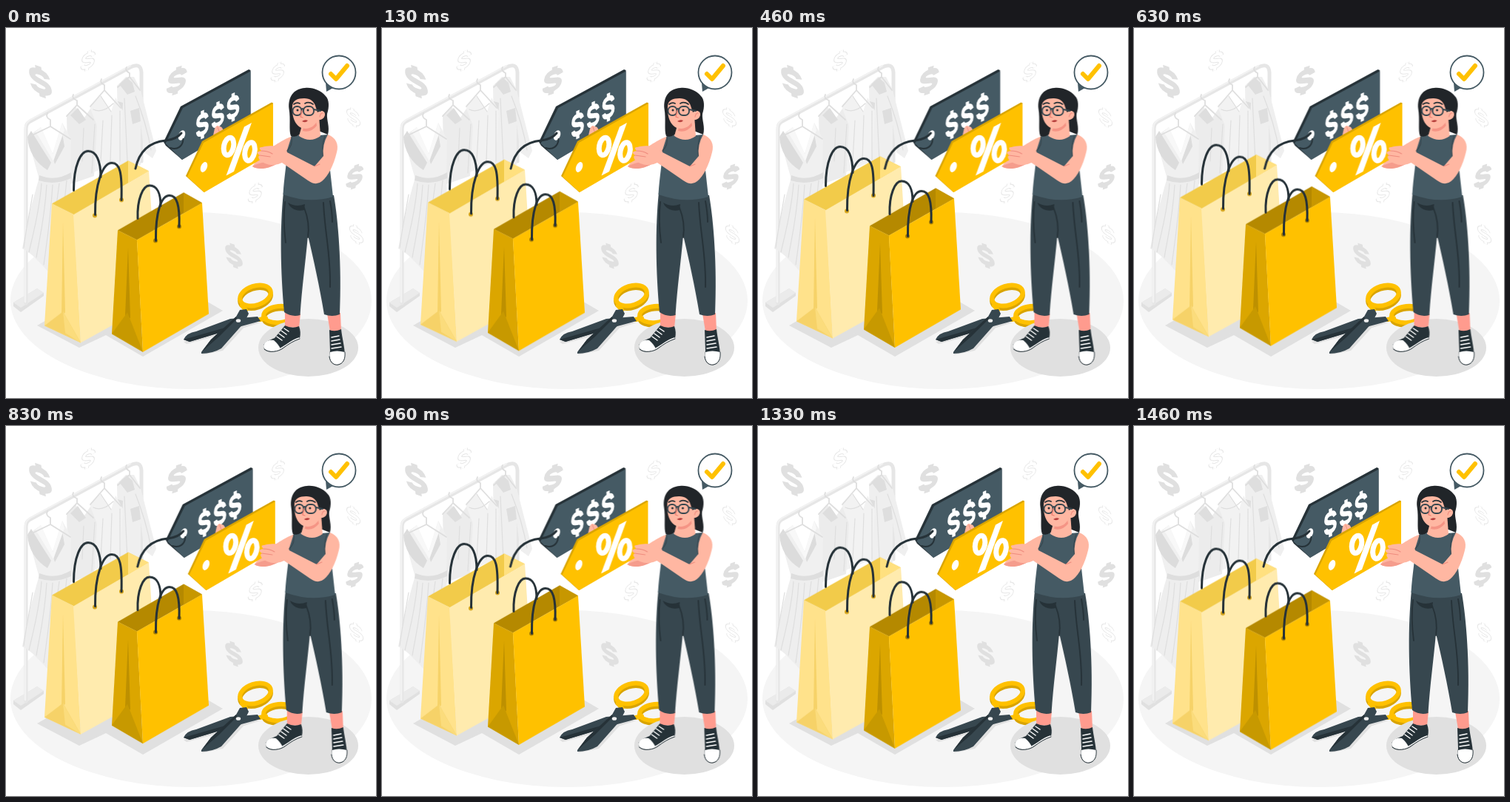
An HTML page for the animation above (1500 ms loop, 500 by 500 pixels).

```html
<!DOCTYPE html>
<html lang="en">
<head>
<meta charset="utf-8">
<title>Discount shopping</title>
<style>
  html, body { margin: 0; width: 100%; height: 100%; overflow: hidden; background: #fff; }
  svg { display: block; width: 100%; height: 100%; }
  .line { fill: none; stroke-linecap: round; stroke-linejoin: round; }
  .cord { stroke: #263238; stroke-width: 3; }
  .fold { stroke: #dedede; stroke-width: 1.2; }
  .crease { stroke: #263238; stroke-width: 1.8; }
  .lace { stroke: #fff; stroke-width: 1.5; }
  .skin { fill: #ffb7a2; }
  .float { animation: float 1.5s linear infinite; }
  .shake { animation: shake 1.5s ease infinite; }
  @keyframes float { 50% { transform: translateY(-10px); } }
  @keyframes shake {
    0%, 100% { transform: translateX(0); }
    10%, 90% { transform: translateX(-1px); }
    20%, 80% { transform: translateX(2px); }
    30%, 50%, 70% { transform: translateX(-4px); }
    40%, 60% { transform: translateX(4px); }
  }
</style>
</head>
<body>
<svg viewBox="0 0 500 500">
  <defs>
    <path id="dollar" fill="none" d="M9,-6C8,-10 5,-12 0,-12C-6,-12 -9,-10 -9,-6C-9,-2 -4,-1 0,0C5,1 9,2 9,6C9,10 5,12 0,12C-6,12 -9,10 -9.5,6M0,-19V-12M0,12V19"/>
  </defs>

  <ellipse cx="250" cy="368.500" rx="244" ry="119.500" fill="#f5f5f5"/>
  <g id="money"></g>

  <g id="rack">
    <path d="M10,371L42,352L51,358L51,362L20,384L10,376Z" fill="#e0e0e0"/>
    <path d="M10,371L42,352L51,358L20,378Z" fill="#ebebeb"/>
    <path class="line" stroke="#e6e6e6" stroke-width="5" d="M27,372V136Q27,129 33,126L168,53Q182,46 183,60V180"/>
    <path class="line" stroke="#f2f2f2" stroke-width="2.500" d="M26,370V136Q26,128 33,124L168,51"/>
    <path d="M150,78L162,66L173,66L182,84L203,166L198,176L187,168L182,130V185L152,188Z" fill="#efefef"/>
    <path d="M153,76L163,67L171,74L174,86L164,90ZM147,98L158,101L157,118L148,110ZM168,112L180,108L182,126L171,130Z" fill="#dedede"/>
    <path d="M114,104L128,92L142,113L148,94L158,112L154,180L116,196Z" fill="#f2f2f2"/>
    <path d="M82,118L94,106L104,124L114,109L123,132L119,200L84,212Z" fill="#ececec"/>
    <path d="M87,118L97,108L108,124L99,130Z" fill="#dedede"/>
    <path class="line fold" d="M118,110Q130,116 145,102M128,92L142,113M105,135L103,180M131,125L128,180M143,118L141,180M160,95L164,180M175,92Q190,130 196,165M116,196L120,130M154,112V180"/>
    <path d="M45,202L87,198L90,330H58C46,318 35,304 22,298C28,264 36,232 45,202Z" fill="#eeeeee"/>
    <path d="M29,147L47,134L63,170L76,128L88,150L87,200L45,205Z" fill="#f0f0f0"/>
    <path d="M29,147L34,139L47,160L61,182L56,192C40,182 30,166 29,147ZM62,172L76,142L79,160L66,184Z" fill="#dcdcdc"/>
    <path d="M47,134L63,170L76,128L79,138L64,180L40,140Z" fill="#f8f8f8"/>
    <path d="M45,199Q67,208 88,195L88,203Q66,213 44,206Z" fill="#dedede"/>
    <path class="line fold" d="M48,210C45,250 36,280 31,303M55,212C52,260 45,285 41,310M63,212C60,260 55,290 51,320M72,210L68,240M82,206L79,235M36,225C31,255 26,278 24,297"/>
    <path class="line" stroke="#dedede" stroke-width="1.800" d="M31,147L60,133L87,150M60,133V124Q53,121 56,115M82,119L96,104L118,124M96,104V98Q88,95 91,90M114,106L133,84L155,108M133,84V77Q126,74 129,69M151,80L167,66L181,84M167,66V61Q160,57 163,53"/>
  </g>

  <path d="M42,402L70,386L210,360L150,408L99,432Z" fill="#e0e0e0"/>
  <path d="M128,411L160,390L262,364L293,382L185,444Z" fill="#e0e0e0"/>

  <g class="float">
    <g transform="translate(0 .6)">
      <path d="M62,237L165,179L193,193L92,252Z" fill="#f2cb4a"/>
      <path d="M165,179L193,193L165,209Z" fill="#ffe07f"/>
      <path d="M62,237L92,252L101,425L52,402Z" fill="#ffe28b"/>
      <path d="M77,263L80,384L75,388Z" fill="#f6d268"/>
      <path d="M77,383L101,425L52,402Z" fill="#f6d268"/>
      <path d="M77,383L101,425L80,412Z" fill="#fbdc7c"/>
      <path d="M91,252L193,193L204,368L101,425Z" fill="#ffebae"/>
      <path class="line cord" d="M91.500,219C91.500,185 101,166 111,166C122,166 128,179 128,201"/>
      <circle cx="120" cy="253" r="3" fill="#d6a51c"/><circle cx="156" cy="232" r="3" fill="#d6a51c"/>
      <path class="line cord" d="M120.500,252C120,209 131,182 143,182C154,182 157,195 156,232"/>

      <path d="M151,273L240,222L265,236L177,286Z" fill="#b58900"/>
      <path d="M240,222L265,236L240,250Z" fill="#c79700"/>
      <path d="M151,273L177,286L185,437.500L143,413Z" fill="#dba600"/>
      <path d="M165,297L168,392L161,388Z" fill="#bd9000"/>
      <path d="M164,384L185,437.500L143,413Z" fill="#c79900"/>
      <path d="M177,286L265,236L274,386L185,437.500Z" fill="#ffc100"/>
      <path class="line cord" d="M178,257C177,231 185,212.500 194,212.500C204,212.500 209,223 209,240"/>
      <circle cx="202" cy="287" r="3" fill="#a77d00"/><circle cx="234" cy="268" r="3" fill="#a77d00"/>
      <path class="line cord" d="M202.500,287C202,247 210,226 221,226C231,226 235,239 234,268"/>
    </g>
  </g>

  <g id="scissors">
    <path d="M240,424L305,398L344,398L322,405L300,412L244,427ZM264,442L316,392L324,402L293,436Z" fill="#e0e0e0"/>
    <g class="line" stroke="#d9a400" stroke-width="6">
      <ellipse cx="337" cy="365" rx="21.500" ry="13" transform="rotate(-18 337 365)"/>
      <ellipse cx="369" cy="390.500" rx="21" ry="11" transform="rotate(-6 369 390.500)"/>
    </g>
    <g class="line" stroke="#ffc100" stroke-width="6">
      <ellipse cx="337" cy="361.500" rx="21.500" ry="13" transform="rotate(-18 337 361.500)"/>
      <ellipse cx="369" cy="387" rx="21" ry="11" transform="rotate(-6 369 387)"/>
      <path d="M319,375L324,381M343,394L351,392"/>
    </g>
    <path d="M240,421Q244,412 257,410L303,393L340,390L344,396L318,403L298,409L248,424Z" fill="#37474f"/>
    <path d="M240,421L248,424L298,409L318,403L296,405Z" fill="#263238"/>
    <path d="M264,438L277,421L311,390L316,381L325,380L328,386L322,398L291,433Q279,440 264,440Z" fill="#37474f"/>
    <path d="M264,438L277,421L311,390L312,393L288,417Z" fill="#263238"/>
    <ellipse cx="314" cy="395.500" rx="3.200" ry="2.300" fill="#f0f0f0"/>
  </g>

  <ellipse cx="408.500" cy="432" rx="67.500" ry="39" fill="#e0e0e0"/>

  <g class="shake">
    <path d="M213,154L236,106L328,56L330.500,57V122L238,178L216,159Z" fill="#263238"/>
    <path d="M215.500,156L239,108L330.500,58.500V124L238,178Z" fill="#455a64"/>
    <ellipse cx="237.500" cy="145" rx="4.300" ry="7" fill="#fff" transform="rotate(22 237.500 145)"/>
    <path class="line cord" d="M175,190C180,166 195,154 216,152C226,151 233,147 237,142"/>
    <path class="line" stroke="#263238" stroke-width="2" d="M239.500,150C239,160 232,165 222,162"/>
    <g id="price" stroke="#fff" stroke-width="6.500"></g>

    <path class="skin" d="M388,146C374,150 366,158 346,169L333,187C342,193 357,189 365,184L386,168Z"/>
    <path d="M333,187C341,182 352,182 366,174L365,184C357,189 342,193 333,187Z" fill="#f59c8c"/>
    <path class="skin" d="M280,145L282,136Q285,130 288,133Q292,132 294,139L296,148Z"/>
    <path class="line" stroke="#f08f80" d="M286,134L289,142"/>

    <path d="M243,200L265,153L359,100.500L361,101.500V167L267.500,222Z" fill="#d9a400"/>
    <path d="M245,201L267,155L361,102V168L268,222Z" fill="#ffc100"/>
    <ellipse cx="267.500" cy="188" rx="4.300" ry="7.200" fill="#fff" transform="rotate(22 267.500 188)"/>
    <g class="line" stroke="#fff" stroke-width="7">
      <ellipse cx="301" cy="160" rx="6.500" ry="12" transform="rotate(12 301 160)"/>
      <ellipse cx="329.500" cy="167" rx="6.500" ry="12.500" transform="rotate(12 329.500 167)"/>
    </g>
    <path d="M322,133.500L332,128L308,194L297.500,199.500Z" fill="#fff"/>

    <path d="M377,382L398,386L396,405L377,404ZM434,386L452,385L453,410L438,410Z" fill="#ff9b8e"/>
    <path d="M348,430C348,424 356,422 363,419L377,402Q387,407 396,403Q399,411 397,419C385,423 378,431 369,435C358,440 349,437 348,430Z" fill="#263238"/>
    <path d="M348,430C349,423 356,421 362,422Q369,428 371,434C361,440 349,437 348,430Z" fill="#fff"/>
    <path class="line" stroke="#fff" stroke-width="1.500" d="M371,433C379,429 386,422 396,419"/>
    <path class="line" stroke="#263238" d="M349,434C355,440 369,437 374,433C382,427 388,423 397,420"/>
    <path class="line lace" d="M366,417L373,422M369,413L376,418M372,409L379,414M376,406L382,410"/>
    <path d="M437,408Q445,411 453,407C454,418 458,432 458,443C458,452 452,456 446,455C438,454 436,446 438,436Z" fill="#263238"/>
    <path d="M438,438Q447,435 458,438C460,449 454,456 446,455C439,454 436,446 438,438Z" fill="#fff"/>
    <path class="line" stroke="#263238" d="M437,444C438,453 444,456 449,455C456,453 459,447 458,438"/>
    <path class="line lace" d="M440,418L450,416M440,423L451,421M440,428L452,426M440,433L453,431"/>

    <path d="M375,222L443,226C449,260 454,320 451,387Q441,391 430,387C424,350 415,310 408,280C405,315 400,350 397.500,388Q386,391 376,384C371,330 370,270 375,222Z" fill="#37474f"/>
    <path d="M381,236Q392,243 404,238L403,246Q391,249 383,240Z" fill="#263238"/>
    <path class="line crease" d="M403,243Q411,263 408,283M429,236C431,280 439,305 438,350M377,235Q374,260 378,290M438,234Q441,250 441,262"/>

    <path d="M386,146L396,145Q409,154 424,145L435,144L442,166L438,192L442,228Q410,238 374.500,225C376,200 380,180 380,165Z" fill="#455a64"/>
    <path class="line" stroke="#37474f" stroke-width="1.200" d="M386,147Q388,158 380,166M431,146Q425,163 430,178"/>

    <path d="M404,81C388,82 381,94 382.500,109C385,124 382,138 385,146Q391,148 397,144L420,138L435,144C438,134 433,124 434,116C437,107 437,97 432,92C425,84 415,80 404,81Z" fill="#212529"/>
    <path class="skin" d="M401,128L423,118L425,146Q411,156 396,146Z"/>
    <path d="M402,134Q413,135 419,126L420,132Q412,142 401,139Z" fill="#f59485"/>
    <path class="skin" d="M387,106C387,98 394,95 403,95C411,95 416,99 418,105L421,114C426,110 432,112 431,118Q429,125 421,124C419,131 412,136 405,136C393,136 386,123 387,106Z"/>
    <path class="line" stroke="#ef8c7e" stroke-width="1.100" d="M424,120Q425,115 428,115"/>
    <path class="line" stroke="#263238" stroke-width="1.700" d="M389,103Q393,100 397,102M404,102Q409,99 415,103"/>
    <g class="line" stroke="#37474f" stroke-width="1.900">
      <rect x="387.500" y="106" width="12" height="12" rx="5.500"/>
      <rect x="402" y="106" width="14" height="12" rx="5.500"/>
      <path d="M399.500,110Q401,108 402,110M416,110L425,112"/>
    </g>
    <circle cx="394" cy="111" r="1.500" fill="#263238"/><circle cx="408" cy="111" r="1.500" fill="#263238"/>
    <path class="line" stroke="#ee7d70" stroke-width="1.300" d="M400,112L398,120L401,121"/>
    <path d="M400,126Q404,123 408,125Q405,129 400,126Z" fill="#b7403d"/>

    <path class="skin" d="M435,144C446,148 450,157 447,168C443,185 435,201 427,207Q419,214 408,206L373,182Q362,188 350,183Q342,180 341,174L343,172Q338,169 341,167L345,166Q340,161 346,161C356,158 367,158 378,167L417,187L429,173Q427,158 435,144Z"/>
    <path class="line" stroke="#ef8c7e" stroke-width="1.200" d="M345,166Q354,166 360,170M343,172L357,174M417,187L424,184"/>
  </g>

  <circle cx="450" cy="60" r="22.500" fill="#fff" stroke="#455a64" stroke-width="1.800"/>
  <path d="M432,74L433,86L442,81Z" fill="#455a64"/>
  <path class="line" stroke="#ffc100" stroke-width="6" d="M439,62L446,69L461,51"/>
</svg>
<script>
  const NS = "http://www.w3.org/2000/svg";

  function dollar(parent, matrix, style = {}) {
    const use = document.createElementNS(NS, "use");
    use.setAttribute("href", "#dollar");
    use.setAttribute("transform", `matrix(${matrix.join(",")})`);
    for (const key in style) use.setAttribute(key, style[key]);
    parent.append(use);
  }

  const price = document.getElementById("price");
  [[265.5, 130.5], [286.5, 118.5], [307, 107]].forEach(([x, y]) =>
    dollar(price, [0.68, -0.34, 0, 1, x, y]));

  // x, y, size, lean direction, outlined
  const coins = [
    [46.5, 72.5, 1.12, 1, 0], [231, 71, 1, -1, 0],
    [308, 308, 0.86, 1, 0], [471.5, 201, 0.86, -1, 0],
    [111, 44, 0.72, -1, 1], [367.5, 59.5, 0.68, -1, 1],
    [469.5, 121, 0.67, 1, 1], [337, 223, 0.7, -1, 1],
    [473.5, 279, 0.68, 1, 1]
  ];
  const money = document.getElementById("money");
  for (const [x, y, s, lean, outlined] of coins) {
    const m = [s, 0.35 * lean * s, 0.15 * lean * s, s, x, y];
    dollar(money, m, { stroke: outlined ? "#e8e8e8" : "#e0e0e0", "stroke-width": outlined ? 8.5 : 7.5 });
    if (outlined) dollar(money, m, { stroke: "#fff", "stroke-width": 5.5 });
  }
</script>
</body>
</html>
```
